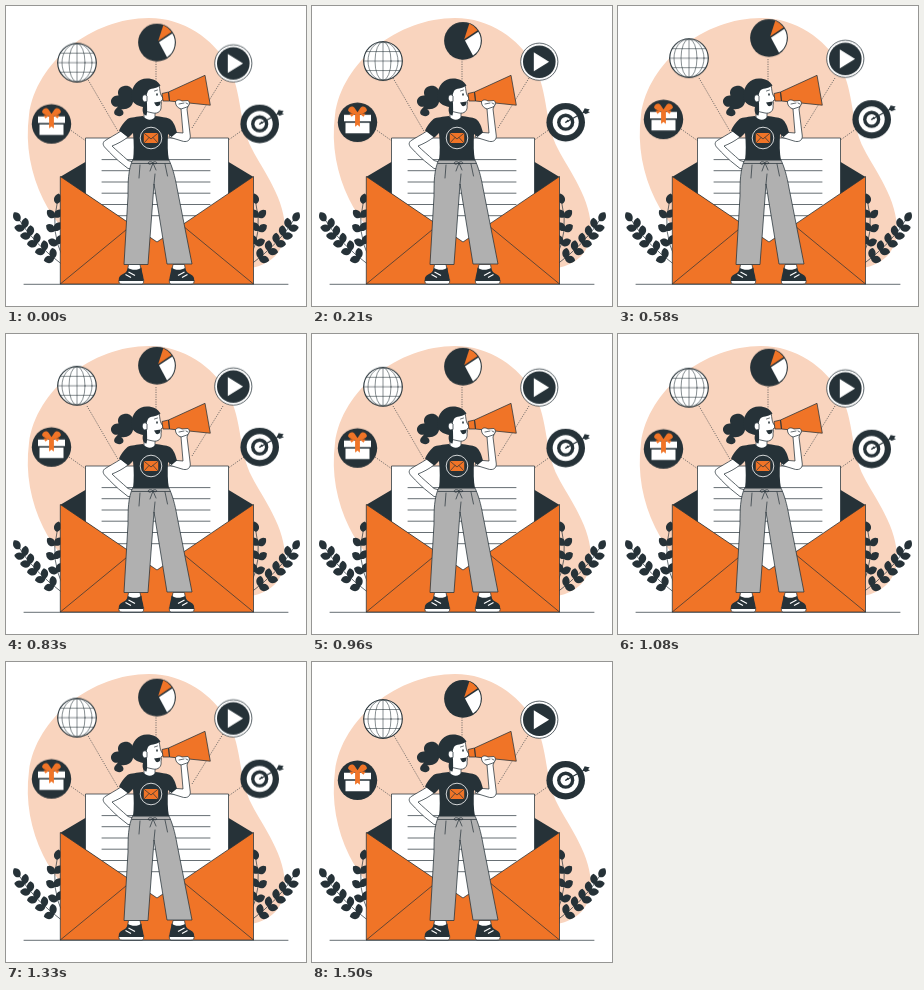
These frames come from a looping animation (300x300 px, 1540 ms). An HTML page:

```html
<!DOCTYPE html>
<html>
<head>
<meta charset="utf-8">
<style>
  html, body { margin: 0; width: 100%; height: 100%; overflow: hidden; background: #fff; }
  svg { display: block; width: 100vw; height: 100vh; }
  .ln { fill: none; stroke: #263238; stroke-width: .7; stroke-linecap: round; stroke-linejoin: round; }
  .w { fill: #fff; }
  .d { fill: #263238; }
  .o { fill: #f07427; }
  .s { stroke: #263238; stroke-width: .75; stroke-linejoin: round; }
  .dots { fill: none; stroke: #263238; stroke-width: .6; stroke-dasharray: 1.2 1.2; }
</style>
</head>
<body>
<svg viewBox="0 0 300 300">
  <path fill="#f9d4be" d="M143 12C178 12 207 33 222 59C237 88 232 116 246 143C257 165 280 193 279 226C278 246 264 260 240 263L90 250C64 234 47 214 37 193C25 168 19 140 23 109C30 56 86 12 143 12Z"/>

  <path class="dots" d="M81 72L113 127M150 53V80M217 72L186 122M63 123L80 135M238 123L221 135"/>

  <g id="plants"></g>
  <path class="ln" d="M18 278.300H282"/>

  <!-- envelope and letter -->
  <path class="d" d="M54 171L81 155H221L247.500 171L220 192H82Z"/>
  <path class="w s" d="M79.500 132H222.500V190L151 237L79.500 188Z"/>
  <path class="ln" d="M96 153.600H204M96 164.700H204M96 176H204M96 187.200H204M96 198.500H204M107 209.700H193"/>
  <path class="o s" d="M54.300 170.500L151 236L247.500 170.500V278H54.300Z"/>
  <path class="ln" d="M54.300 278L126 219M247.500 278L175.800 219"/>

  <!-- floating icons -->
  <g id="icons">
    <g transform="translate(71 57)">
      <circle class="w s" r="19.300" style="stroke-width:1.100"/>
      <g class="ln" style="stroke-width:.55">
        <ellipse rx="8" ry="19.300"/><ellipse rx="15" ry="19.300"/>
        <path d="M0-19.300V19.300M-19.300 0H19.300M-16.800-9.500H16.800M-16.800 9.500H16.800"/>
      </g>
    </g>
    <g transform="translate(151 36.800)">
      <circle class="d" r="18.900"/>
      <path class="w" d="M2-.2L15.300-9A17.700 17.700 0 0 1 10 14.800Z"/>
      <path class="o" d="M1.200-1.500L6.300-17.400A18 18 0 0 1 14.600-10.500Z"/>
    </g>
    <g transform="translate(227.300 57.700)">
      <circle class="w s" r="18.600"/>
      <circle class="d" r="16.300"/>
      <path class="w" d="M-5.500-9.500V9.500L9.800 0Z"/>
    </g>
    <g transform="translate(45.500 118.200)">
      <circle class="d" r="19.700"/>
      <path class="w" d="M-13.500-7.500H13.500V-1H-13.500ZM-12 .6H12V11H-12Z"/>
      <path class="o" d="M-2.400-8H2.400V4.500L0 2.500L-2.400 4.500ZM0-8C-3-8-8-9-9.500-12C-9-15.500-5-17-3-14.500L0-10L3-14.500C5-17 9-15.500 9.500-12C8-9 3-8 0-8Z"/>
      <path class="o" d="M-1-9.500L-6-5.500L-8-8.500ZM1-9.500L6-5.500L8-8.500Z"/>
    </g>
    <g transform="translate(253.700 118.200)">
      <circle class="d" r="19.300"/><circle class="w" r="13"/>
      <circle class="d" r="8.600"/><circle class="w" r="5.200"/>
      <path class="ln" style="stroke-width:1.200" d="M0 0L20-11"/>
      <path class="d" d="M-1 .6L2-2.800L3.400-.6ZM17-10L19-14L22-13.200L24-13L22.300-11L24.300-10L20-8.300Z"/>
    </g>
  </g>

  <!-- arms -->
  <path class="w s" d="M115 125C109 129 103 132 98.500 135C96.500 137 97 139 98.500 141C105 148 111 154 117 158.500L122 162.500L127 163V156L122 154.500C116 149 110 144 106 140C111 138 117 135 122 131Z"/>
  <path class="w s" d="M165 126L177 127L175 103L171 99L171 95.500L181 95L183 98L181 103L184.300 130C184.500 135 180 136.500 176 135L163 131Z"/>

  <!-- trousers -->
  <path fill="#b0b0b0" class="s" d="M127 153H162.500C166 160 169 170 171 182L186 258H161L148 178L142 258.500H118L122 190C122 176 122 164 127 153Z"/>
  <path class="ln" d="M126 157.500H164M148 178L149 168M146 156C140 154 142 161 146 157C151 153 153 160 147 157L144 165M147 157L150 164M134 159L133 172M159 158L161.500 170"/>

  <!-- shoes -->
  <g id="shoe">
    <path class="w s" d="M122.500 258.500H134L135.500 266L121 267Z"/>
    <path class="w s" d="M113 274C112.500 277 113.500 278 116 278H136C137.500 278 138 276 137.500 273Z"/>
    <path class="d" d="M122 262C126 264.500 132 264.500 135.500 261.500C135.500 266 138 270 137.500 275H113C112 270.500 115 269 118 267.500C121 266 121 264 122 262Z"/>
    <path d="M119.500 268.500L125 271.500M122.500 266L129 269.500" stroke="#fff" stroke-width="1.200"/>
  </g>
  <use href="#shoe" transform="translate(301) scale(-1 1)"/>

  <!-- neck and shirt -->
  <path class="w s" d="M138 101V112C141 118 147 117 149 112V105Z"/>
  <path class="d" d="M137 110C131 111 125 111 121.500 113C118 116 115 120 113 124.500L122.500 131.500L127 127C128 137 128 146 127 154.500H163C161.500 147 161.500 138 162 128L165.500 131L171 126.500C169.500 121 168 116 164 113C160 111 155 111 149.500 110C147 115 141 115 137 110Z"/>
  <circle cx="145" cy="132" r="10.800" fill="none" stroke="#fff" stroke-width=".8"/>
  <path class="o" d="M137.800 127H152.200V137H137.800Z"/>
  <path class="ln" d="M138 127.200L145 133L152 127.200M138 137L143 131.500M152 137L147 131.500"/>

  <!-- head -->
  <path class="d" d="M128 88C127 81 122 79 118 80C113 81 111 85 112.500 89.500C107 89 103 94 106 98.500C108 102 113 101 114.500 99C111 101 107 105 108.500 108C111 111 117 111 117.500 107C117.500 105 116.500 104 115 103C121 104 126 101 127 96Z"/>
  <path class="w s" d="M137 82L153 79C154 84 154 87 155 89L157.500 93L155 95L155.500 97.500L155 99C156 105 152 108 147 107L138 105Z"/>
  <path class="d" d="M125 90C126 79 132 72.500 141 72.500C147 72.500 152 75 154.500 79.500C150 83 144 82 142 85C140 89 140 93 141 97C141 102 141.500 106 140.500 109.500C137 109 136 105 137 101C132 100 125 97 125 90Z"/>
  <path class="w s" d="M140 89C136 88 135 93 138 96L141 95.500V90Z"/>
  <path class="ln" d="M148.500 85L151.500 84"/>
  <ellipse class="d" cx="151" cy="88.500" rx=".8" ry="1.300"/>
  <path class="d" d="M148 96.500L154.500 95.500C155 99 152 101 150 99.800Z"/>

  <!-- megaphone -->
  <path class="o s" d="M156 87.500L162.500 86L163.500 95L157 95ZM162.500 86L199 69.300L204.300 99.200L163.500 95Z"/>
  <path class="w s" d="M169.500 97C169 94 173 93 176 95L182 94.500C184 96 184 99 181 101L175 103C172 102 170 100 169.500 97Z"/>
  <path class="ln" d="M173 98L178 97M180 97L182 98"/>
</svg>
<script>
  const LOOP = 1540, PHASE = 40, RISE = 6;

  const leaf = (x, y, turn) =>
    `<path class="d" transform="translate(${x} ${y}) rotate(${turn})" d="M0 0C1-5 7-6 10.500-1C9 4 3 4.500 0 0Z"/>`;

  // Pairs of leaves along a quadratic stem, closed by one at the tip.
  function sprig([x0, y0], [cx, cy], [x1, y1], count) {
    let out = `<path class="ln" d="M${x0} ${y0}Q${cx} ${cy} ${x1} ${y1}"/>`;
    for (let i = 1; i <= count; i++) {
      const t = i / count, u = 1 - t;
      const x = u * u * x0 + 2 * u * t * cx + t * t * x1;
      const y = u * u * y0 + 2 * u * t * cy + t * t * y1;
      const dir = Math.atan2(u * (cy - y0) + t * (y1 - cy), u * (cx - x0) + t * (x1 - cx)) * 180 / Math.PI;
      out += i < count ? leaf(x, y, dir - 45) + leaf(x, y, dir + 45) : leaf(x, y, dir);
    }
    return out;
  }

  const side = sprig([58, 260], [27, 237], [14, 215], 6) + sprig([57, 252], [44, 225], [51, 198], 4);
  document.getElementById('plants').innerHTML =
    `<g>${side}</g><g transform="translate(301) scale(-1 1)">${side}</g>`;

  document.getElementById('icons').animate(
    [0, -RISE, 0].map(y => ({ transform: `translateY(${y}px)` })),
    { duration: LOOP, delay: -PHASE, iterations: Infinity, easing: 'linear' }
  );
</script>
</body>
</html>
```
